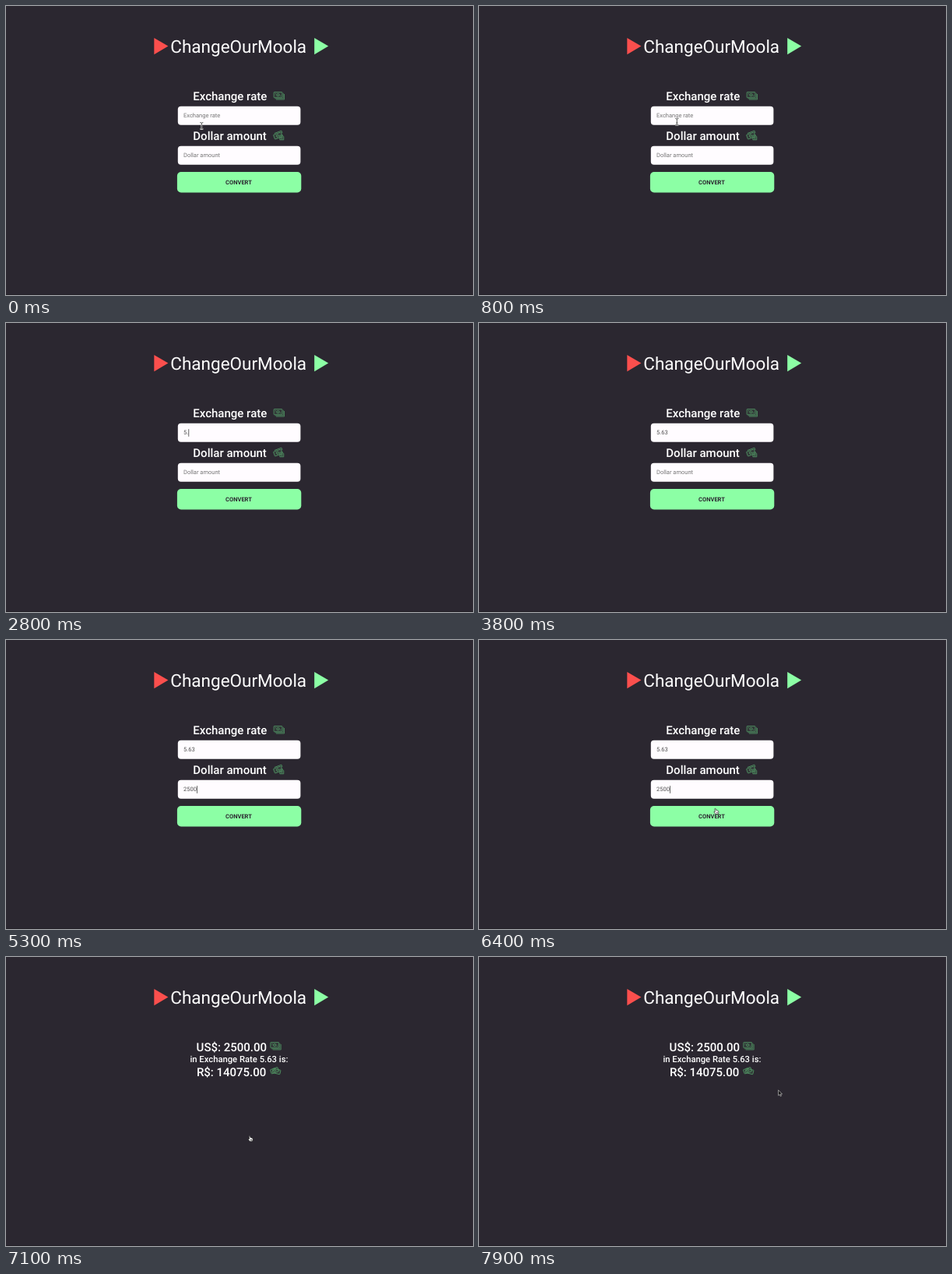
Recreate the animation shown at these times as an HTML page. Size 600 px wide and 371 px high, loop 8000 ms.

```html
<!DOCTYPE html>
<html lang="en">
<head>
<meta charset="utf-8">
<title>Currency converter</title>
<style>
  html, body { margin: 0; width: 100%; height: 100%; overflow: hidden; background: #2b2730; }
  svg { display: block; width: 100vw; height: 100vh; font-family: Roboto, Arial, sans-serif; text-rendering: geometricPrecision; }
  .title { font-size: 22.5px; fill: #fff; }
  .label { font-size: 15px; font-weight: 500; fill: #fff; }
  .note { font-size: 11.25px; }
  .value { font-size: 7.5px; fill: #505050; }
  .empty { fill: #757575; }
  .action { font-size: 7.5px; font-weight: 700; fill: #2b2730; text-anchor: middle; }
  .field { fill: #fffcff; }
  .icon { fill: #529765; fill-opacity: .18; stroke: #529765; stroke-width: .8; stroke-linejoin: round; }
  .edge { fill: none; }
  .halo { fill: none; stroke: #fff; stroke-width: 1.7; }
  .beam { fill: none; stroke: #333; stroke-width: .8; }
</style>
</head>
<body>
<svg viewBox="0 0 600 371" preserveAspectRatio="none">
  <defs>
    <g id="bills" class="icon">
      <rect x=".5" y=".5" width="10.8" height="7.2" rx=".6"/>
      <circle cx="5.9" cy="4.1" r="1.7"/>
      <path class="edge" d="M2 2.6h1.2M8.6 5.6h1.2M12.6 1.8v7H2M13.9 3v7H3.4"/>
    </g>
    <g id="billNote" class="icon">
      <g transform="rotate(-20 5 5)">
        <rect x="0" y="2.6" width="10.4" height="6" rx=".6"/>
        <circle cx="4.6" cy="5.6" r="1.5"/>
        <path class="edge" d="M2 1.2h9.6v3"/>
      </g>
      <path d="M7.8 5h3.4l1.6 1.6v4.2h-5zM8.8 7.6h2.8M8.8 9.2h2.8"/>
    </g>
    <g id="fanned" class="icon">
      <rect x="3.2" y="3.4" width="10" height="5.6" rx=".6" transform="rotate(14 8 6)"/>
      <g transform="rotate(-20 6 5)">
        <rect x=".6" y="2.2" width="10" height="5.6" rx=".6"/>
        <circle cx="5.6" cy="5" r="1.4"/>
      </g>
    </g>
    <path id="beamShape" d="M-2-4.2Q0-4.2 0-3Q0-4.2 2-4.2M0-3V3M-2 4.2Q0 4.2 0 3Q0 4.2 2 4.2M-1 1.4H1"/>
  </defs>

  <rect width="600" height="371" fill="#2b2730"/>
  <rect y="370" width="600" height="1" fill="#232127"/>

  <path d="M190.3 41V62.2L208.4 51.6Z" fill="#fb4f4d"/>
  <text class="title" x="211.3" y="59.5">ChangeOurMoola</text>
  <path d="M396.2 41V62.2L414.2 51.6Z" fill="#8cffa5"/>

  <g id="form">
    <text class="label" x="240.3" y="120.5">Exchange rate</text>
    <use href="#bills" x="343.6" y="110"/>
    <rect class="field" x="220.8" y="128.8" width="157.6" height="24" rx="4"/>
    <text id="rate" class="value" x="228" y="143.3"></text>
    <text class="label" x="240.3" y="171.5">Dollar amount</text>
    <use href="#billNote" x="344" y="161"/>
    <rect class="field" x="220.8" y="179.8" width="157.6" height="24" rx="4"/>
    <text id="dollars" class="value" x="228" y="194.3"></text>
    <rect id="button" x="219.9" y="213" width="159.4" height="26.4" rx="5"/>
    <text class="action" x="299" y="229">CONVERT</text>
    <rect id="caret" width=".8" height="9.6" fill="#444"/>
  </g>

  <g id="result">
    <text class="label" x="244.6" y="121.2">US$: 2500.00</text>
    <use href="#bills" x="339.3" y="109"/>
    <text class="label note" x="236.4" y="135.2">in Exchange Rate 5.63 is:</text>
    <text class="label" x="244.9" y="153.1">R$: 14075.00</text>
    <use href="#fanned" x="339.4" y="140.6"/>
  </g>

  <g id="pointer">
    <g id="beam">
      <use href="#beamShape" class="halo"/>
      <use href="#beamShape" class="beam"/>
    </g>
    <path id="arrow" d="M0 0V7L1.6 5.6L2.7 8L3.8 7.5L2.8 5.2H4.9Z" fill="#111" stroke="#ddd" stroke-width=".6"/>
    <path id="hand" d="M-1.6-3.4Q-.8-4.2-.3-3.2L.4-1.2Q2.6-1.5 3.2-.2L3.4 1.6L2.6 3.6H-.4L-2.6 1Q-2.8-.2-1.2.5ZM.6.8V2.4M1.8.8V2.4" fill="#fff" stroke="#222" stroke-width=".7"/>
  </g>
</svg>

<script>
const LOOP = 8000, STEP = 100;
const $ = id => document.getElementById(id);

// [start ms, text]
const rateSteps = [[0, ""], [1700, "5"], [2800, "5."], [3000, "5.6"], [3300, "5.63"]];
const dollarSteps = [[0, ""], [4800, "2"], [4900, "25"], [5200, "250"], [5300, "2500"]];
// [start ms, caret shown]
const caretSteps = [[0, 0], [300, 1], [800, 0], [1300, 1], [2200, 0], [2700, 1], [3800, 0],
  [4200, 1], [4700, 0], [4800, 1], [5800, 0], [6300, 1], [6600, 0]];

const at = (steps, t) => steps.filter(s => s[0] <= t).pop()[1];
const clamp = v => Math.max(0, Math.min(1, v));
const mix = (a, b, p) => a + (b - a) * p;
const ease = p => p * p * (3 - 2 * p);
const show = (id, on) => $(id).setAttribute("visibility", on ? "visible" : "hidden");
const textWidth = s => [...s].reduce((w, c) => w + (c === "." ? 1.98 : 4.21), 0);

function travel(from, to, start, end, t) {
  const p = ease(clamp((t - start) / (end - start)));
  return from.map((v, i) => mix(v, to[i], p));
}

function pointerAt(t) {
  if (t < 100) return [251.3, 153.7];
  if (t < 300) return [252.3, 153.4];
  if (t < 1700) return [254.3, 148.6];
  if (t < 5800) return null;
  if (t < 7400) return travel([254.3, 148.6], [313.8, 233.2], 5800, 6600, t);
  return travel([313.5, 232], [384.6, 170.8], 7300, 7900, t);
}

function shapeAt(y, t) {
  if (t >= 7400) return "arrow";
  if (y >= 213) return "hand";
  return y < 155 || (y > 180 && y < 204) ? "beam" : "arrow";
}

function setValue(id, text, hint) {
  $(id).textContent = text || hint;
  $(id).classList.toggle("empty", !text);
}

function draw(t) {
  const done = t >= 7100;
  $("form").style.display = done ? "none" : "";
  $("result").style.display = done ? "" : "none";

  const rate = at(rateSteps, t), dollars = at(dollarSteps, t);
  setValue("rate", rate, "Exchange rate");
  setValue("dollars", dollars, "Dollar amount");

  const second = t >= 4200;
  $("caret").setAttribute("x", 228.2 + textWidth(second ? dollars : rate));
  $("caret").setAttribute("y", second ? 187.2 : 136.2);
  show("caret", at(caretSteps, t));

  const hover = clamp((t - 6400) / 200);
  const shade = [140, 255, 165].map(c => Math.round(c * mix(1, .7, hover)));
  $("button").setAttribute("fill", `rgb(${shade})`);

  const pos = pointerAt(t);
  const kind = pos && shapeAt(pos[1], t);
  for (const id of ["beam", "arrow", "hand"]) show(id, id === kind);
  if (pos) $("pointer").setAttribute("transform", `translate(${pos})`);
}

let last = -1;
function tick() {
  const t = Math.floor(performance.now() % LOOP / STEP) * STEP;
  if (t !== last) draw(last = t);
  requestAnimationFrame(tick);
}
tick();
</script>
</body>
</html>
```
